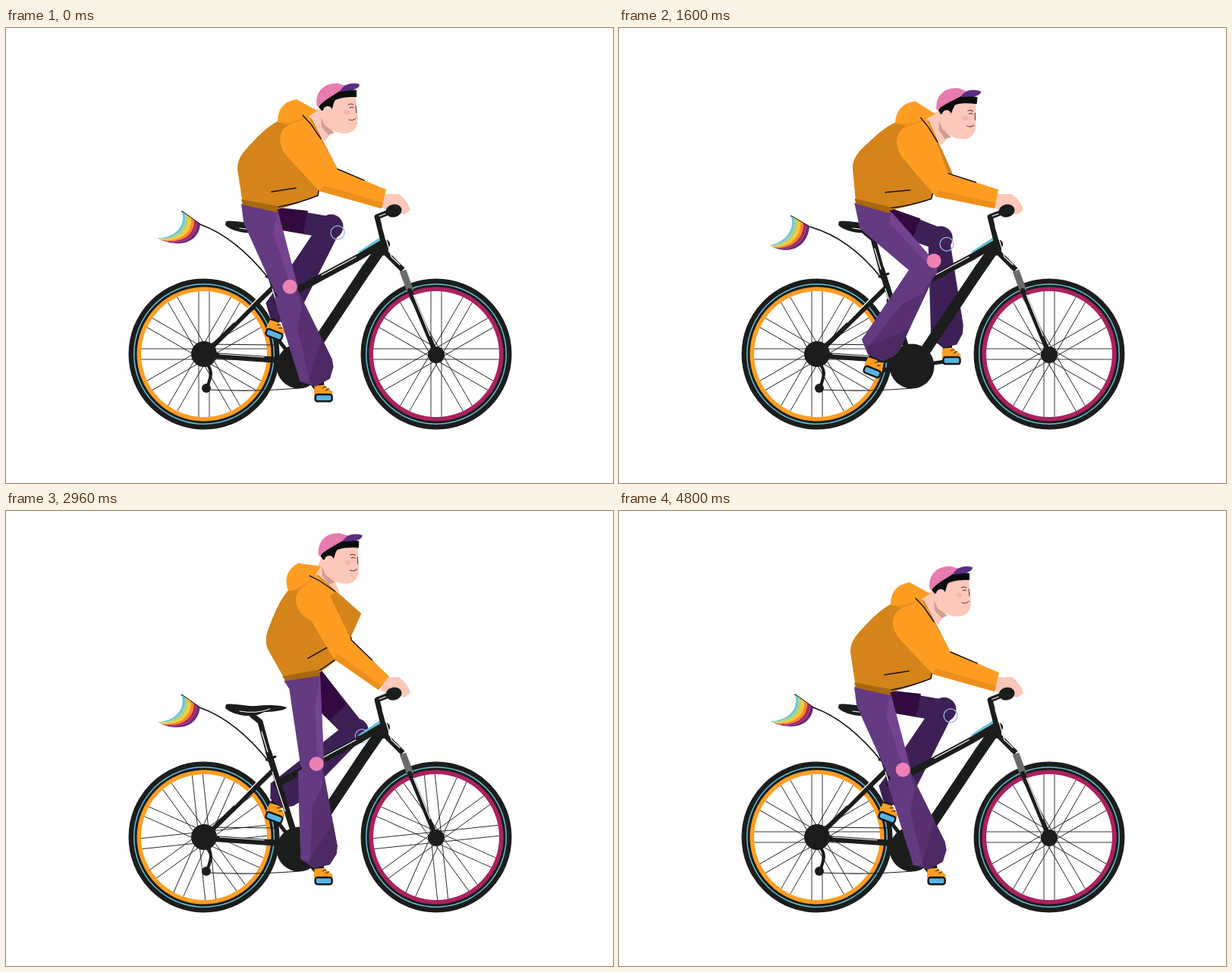
An HTML page that plays this animation: 800 by 600 pixels, repeating every 4880 ms.

```html
<!DOCTYPE html>
<html lang="en">
<head>
<meta charset="utf-8">
<title>Cyclist</title>
<style>
html, body { margin: 0; width: 100%; height: 100%; overflow: hidden; background: #fff; }
svg { display: block; width: 100vw; height: 100vh; }
</style>
</head>
<body>
<svg viewBox="0 0 800 600" stroke-linejoin="round" stroke-linecap="round">
  <g id="wheels"></g>

  <!-- far leg -->
  <g fill="none" stroke="#1b1d1c">
    <path id="farCrank" stroke-width="5"/>
  </g>
  <g id="farFoot"></g>
  <path id="farCalf" fill="#3d2055"/>
  <path id="farThigh" fill="#3d2055"/>
  <path id="farShade" fill="#320a40"/>
  <circle id="farKnee" r="16" fill="#3d2055"/>
  <circle id="farDot" r="9" fill="none" stroke="#9fb4e6" stroke-width="1.3"/>

  <!-- flag -->
  <path id="pole" fill="none" stroke="#151716" stroke-width="1.7"/>
  <g id="flag"></g>

  <!-- bike -->
  <g fill="none" stroke="#1b1d1c">
    <path d="M262 417L356 418M265 477Q330 480 386 475" stroke-width="1.2"/>
    <path d="M264 442C275 455 268 462 265 475" stroke-width="4"/>
    <path d="M493 276L463 296L474 297L498 284Z" fill="#62bfd6" stroke="none"/>
    <path d="M499 293L488 312L440 380L437 386L437 373L470 312Z" fill="#62bfd6" stroke="none"/>
    <path d="M274 432L375 439" stroke-width="8"/>
    <path d="M352 342L268 424" stroke-width="6"/>
    <path d="M324 269L335 278L348 326" stroke-width="7"/>
    <path d="M346 318L380 426" stroke-width="8"/>
    <path d="M343 328L355 324" stroke-width="3"/>
    <path d="M494 285L467 301L357 360" stroke-width="9"/>
    <path d="M497 287L470 326L396 437" stroke-width="14"/>
    <path d="M512 240L489 249L501 297L512 308L523 319" stroke-width="7" stroke-linecap="butt"/>
    <path d="M500 285L497 294" stroke-width="12"/>
    <path d="M523 320L533 347" stroke="#6a6c6c" stroke-width="9" stroke-linecap="butt"/>
    <path d="M532 346L567 430" stroke-width="6"/>
    <path d="M416 326L461 302M301 388L340 348M351 344L368 396M496 262L508 302L519 312M537 352L559 406M492 248L500 245M337 291L345 318M282 430L340 434" stroke="#fff" stroke-width="1.2"/>
  </g>
  <path d="M290 255C302 253 315 258 330 257C345 255 362 256 370 259C369 263 350 265 341 265C335 267 331 271 318 270C308 270 290 264 289 259Z" fill="#1b1d1c"/>
  <path d="M308 264Q330 268 348 261" fill="none" stroke="#fff"/>
  <g fill="#1b1d1c">
    <circle cx="261" cy="430" r="17"/>
    <circle cx="264" cy="475" r="6"/>
    <circle cx="567" cy="431" r="11"/>
    <circle cx="386" cy="446" r="29.5"/>
  </g>

  <!-- near leg -->
  <path id="nearCrank" fill="none" stroke="#1b1d1c" stroke-width="6"/>
  <g id="nearFoot"></g>
  <path id="nearThigh" fill="#643a80"/>
  <path id="nearCalf" fill="#58306f"/>
  <path id="nearShade" fill="#643a80"/>
  <path id="nearHem" fill="#4d2964"/>
  <circle id="nearKnee" r="15" fill="#643a80"/>
  <path id="nearLight" fill="#74438f"/>
  <circle id="nearDot" r="9.5" fill="#ec82b3"/>

  <!-- rider -->
  <path id="neck" fill="#fcc8ba"/>
  <path id="neckShade" fill="#cf9f92"/>
  <g id="torso">
    <path d="M305 186C305 174 310 167 317 159C331 144 344 130 358 123L402 118L437 186L413 210L411 221Q386 232 358 239L312 232Z" fill="#d4841a"/>
    <path d="M310 226L358 235L357 243L312 233Z" fill="#a8680f"/>
    <path d="M413 210L411 221Q386 231 359 236M350 216L382 211" fill="none" stroke="#111" stroke-width="1.5"/>
    <path d="M358 124C358 107 366 97 383 94L410 109L399 116L416 147L404 150L372 126Z" fill="#ff9d23"/>
    <path d="M358 124Q378 127 398 115L391 121L372 128Z" fill="#ec8f1c"/>
  </g>
  <g id="head">
    <path d="M424 90L460 88C463 98 461 105 463 112C466 126 462 139 446 139C431 139 420 130 418 108Z" fill="#fcc8ba"/>
    <path d="M412 104C418 94 432 84 446 80L462 82L462 91C452 91 443 91 434 95C431 99 431 106 429 108L416 109Z" fill="#0b0b0b"/>
    <circle cx="424" cy="109" r="6" fill="#fcc8ba"/>
    <path d="M410 104C406 85 419 72 437 73L448 76C442 84 424 91 411 104Z" fill="#e87bb0"/>
    <path d="M440 84C444 75 453 71 466 74Q466 80 455 82Z" fill="#5b2e82"/>
    <ellipse cx="449" cy="111" rx="4" ry="3" fill="#f8b3a8"/>
    <path d="M451 101Q455 99 458 101M453 105Q456 103 458 105M452 121Q457 123 461 119M461 103L462 112" fill="none" stroke="#5a2b2b" stroke-width="1"/>
  </g>
  <path d="M497 219L518 219Q530 228 533 240L525 246L511 241L494 237Z" fill="#fcc8ba"/>
  <ellipse cx="511" cy="241" rx="10.5" ry="8.5" transform="rotate(-12 511 241)" fill="#1b1d1c"/>
  <path id="arm" fill="#ff9d23"/>
  <path id="armShade" fill="#ec8f1c"/>
  <path id="armLine" fill="none" stroke="#111" stroke-width="1.4"/>
</svg>
<script>
const $ = id => document.getElementById(id);
const TAU = Math.PI * 2, RAD = Math.PI / 180;
const LOOP = 4880, STEP = 80, SPAN = 4800;
const CRANK = [386, 446], CRANK_R = 53;

const clamp = v => Math.min(1, Math.max(0, v));
const ease = v => { v = clamp(v); return v * v * (3 - 2 * v); };
const mix = (a, b, u) => a.map((v, i) => v + (b[i] - v) * u);
const add = (a, b) => [a[0] + b[0], a[1] + b[1]];
const mul = (a, s) => [a[0] * s, a[1] * s];
const turn = ([x, y], deg) => {
  const c = Math.cos(deg * RAD), s = Math.sin(deg * RAD);
  return [x * c - y * s, x * s + y * c];
};
const pt = p => p[0].toFixed(2) + ' ' + p[1].toFixed(2);
const poly = pts => 'M' + pts.map(pt).join('L') + 'Z';
const shape = (id, d) => $(id).setAttribute('d', d);
const place = (id, p) => { $(id).setAttribute('cx', p[0]); $(id).setAttribute('cy', p[1]); };

// hip x y, lean, head x y, tilt, elbow top, elbow bottom, cuff top, cuff bottom
const SIT = [335, 236, 0, 440, 108, 0, 437, 186, 413, 215, 501, 213, 495, 238];
const DIP = [335, 236, 3.2, 448, 115, 6, 434, 192, 417, 222, 500, 213, 495, 238];
const RISE = [352, 225, -7.5, 439, 83, -7, 453, 167, 425, 188, 505, 215, 490, 236];
const STAND = [391, 220, -21, 442, 66, 3, 455, 170, 432, 195, 505, 218, 491, 236];

const FLAG = ['#6ec6d9', '#b5cf72', '#f9c82e', '#f28c28', '#b3265e', '#672a7c'];
const FOOT = `
  <path d="M-11 -25H0L1 -13H-12Z" fill="#151716"/>
  <path d="M-12 -16L0 -17L11 -9Q13 -6 11 -4H-13Z" fill="#ff9d23"/>
  <path d="M-1 -13L3 -15M3 -10L7 -12" stroke="#151716"/>
  <rect x="-11" y="-4.5" width="22" height="9" rx="3" fill="#58b4e4" stroke="#151716" stroke-width="2.5"/>`;

function buildWheel(id, x, rim) {
  let spokes = '';
  for (let i = 0; i < 12; i++) {
    spokes += `<path d="M-7 0V-83M7 0V-83" transform="rotate(${i * 30})"/>`;
  }
  return `<g transform="translate(${x} 430)" fill="none">
    <g id="${id}" stroke="#222" stroke-width=".9">${spokes}</g>
    <circle r="86" stroke="${rim}" stroke-width="6"/>
    <circle r="94" stroke="#1b1d1c" stroke-width="11"/>
    <circle r="92.3" stroke="#62bfd6" stroke-width="1.5"/></g>`;
}

$('wheels').innerHTML = buildWheel('rear', 261, '#ff9d23') + buildWheel('front', 567, '#ad2160');
$('nearFoot').innerHTML = $('farFoot').innerHTML = FOOT;
$('flag').innerHTML = FLAG.map((c, i) => `<path id="stripe${i}" fill="${c}"/>`).join('');

// two full turns, a coast while standing, then one more turn
function pedalAngle(t) {
  const last = clamp((t - 3600) / 1200);
  return 52 + Math.min(t, 2400) * .3 + 360 * Math.pow(last, 1.5);
}

function pose(t, angle) {
  const k = ease((t - 2280) / 560) * (1 - ease((t - 3440) / 480));
  const dip = clamp((.74 - Math.cos((angle - 10) * RAD)) / 1.71);
  const base = mix(SIT, DIP, dip);
  const p = base.map((v, i) =>
    v * (1 - k) * (1 - 2 * k) + RISE[i] * 4 * k * (1 - k) + STAND[i] * k * (2 * k - 1));
  const lift = 2 * k * clamp((3440 - t) / 640) * clamp((t - 2600) / 200);
  p[1] -= lift;
  p[4] -= lift;
  return p;
}

function joint(hip, foot, l1, l2) {
  const dx = foot[0] - hip[0], dy = foot[1] - hip[1], d = Math.hypot(dx, dy);
  const s = Math.max(1, d / (l1 + l2));
  l1 *= s; l2 *= s;
  const a = (l1 * l1 - l2 * l2 + d * d) / (2 * d);
  const h = Math.sqrt(Math.max(0, l1 * l1 - a * a));
  return { p: [hip[0] + (dx * a + dy * h) / d, hip[1] + (dy * a - dx * h) / d], h };
}

function drawLeg(side, angle, hip, l1, l2, waist) {
  const pedal = add(CRANK, mul([Math.cos(angle * RAD), Math.sin(angle * RAD)], CRANK_R));
  const tilt = 25 * Math.max(0, -Math.cos((angle - 20) * RAD));
  const ankle = add(pedal, turn([-5, -23], tilt));
  const { p: knee, h } = joint(hip, ankle, l1, l2);
  shape(side + 'Crank', 'M' + pt(CRANK) + 'L' + pt(pedal));
  $(side + 'Foot').setAttribute('transform', `translate(${pt(pedal)}) rotate(${tilt})`);

  const thigh = Math.atan2(knee[1] - hip[1], knee[0] - hip[0]) / RAD;
  const up = turn([0, -1], thigh);
  const shin = [ankle[0] - knee[0], ankle[1] - knee[1]];
  const len = Math.hypot(...shin), ux = shin[0] / len, uy = shin[1] / len;
  // x runs forward, y runs along the shin from 0 to 1
  const at = (x, y) => [knee[0] + uy * x + ux * y * len, knee[1] - ux * x + uy * y * len];
  const w = side === 'near' ? 1 : .88;

  shape(side + 'Thigh', poly([...waist, add(knee, mul(up, 17 * w)), add(knee, mul(up, -14)), add(hip, mul(up, -20 * w))]));
  shape(side + 'Calf', poly([at(14 * w, -.05), at(25 * w, .84), at(23 * w, .92), at(13 * w, 1.02),
    at(-8 * w, 1.04), at(-25 * w, .94), at(-24 * w, .85), at(-18 * w, .06)]));
  place(side + 'Knee', add(knee, mul(up, 2)));

  if (side === 'far') {
    const mid = mix(hip, knee, .62);
    shape('farShade', poly([...waist, add(mid, mul(up, 16)), add(mid, mul(up, -15)), add(hip, mul(up, -17))]));
    place('farDot', add(knee, [9, 6]));
    return;
  }
  shape('nearShade', poly([at(14, -.05), at(13, .22), at(-3, .42), at(-13, .98), at(-25, .94), at(-24, .85), at(-18, .06)]));
  shape('nearHem', poly([at(22, .6), at(25, .84), at(23, .92), at(13, 1.02), at(-8, 1.04), at(-14, .97)]));
  const high = mix(hip, knee, .25);
  shape('nearLight', poly([waist[1], add(knee, mul(up, 17)), add(knee, mul(up, 8)), add(high, mul(up, 12))]));
  place('nearDot', add(knee, mul(up, 7 + 10 * clamp((h - 12) / 30))));
}

function drawFlag(t) {
  const ph = t / 960 * TAU;
  const drop = 4 * (1 - Math.cos(ph)), w = Math.cos(ph + .26);
  const top = [232 - drop * .85, 242 + drop], low = add(top, [24, 17 - drop * .5]);
  const tip = add(top, [-29 - 3.5 * w, 38 - 3 * w]);
  const edge = u => [
    mix(top, low, u),
    add(top, mix([5, 18], [22, 38], u)),
    add(top, mix([-7, 34], [2, 50 - 2 * w], u)),
    add(tip, [7 * u, 3.5 * u])
  ];
  FLAG.forEach((c, i) => {
    const a = edge(i / 6), b = edge((i + 1) / 6);
    shape('stripe' + i, `M${pt(a[0])}C${a.slice(1).map(pt).join(' ')}L${pt(b[3])}C${pt(b[2])} ${pt(b[1])} ${pt(b[0])}Z`);
  });
  shape('pole', `M346 330Q303 276 ${pt(low)}L${pt(top)}`);
}

function draw(ms) {
  const t = Math.floor((ms % LOOP) / STEP) * STEP % SPAN;
  const spin = `rotate(${t * .15})`;
  $('rear').setAttribute('transform', spin);
  $('front').setAttribute('transform', spin);
  drawFlag(t);

  const angle = pedalAngle(t), p = pose(t, angle);
  const hip = [p[0], p[1]], face = [p[3], p[4]];
  const body = (x, y) => add(hip, turn([x - 335, y - 236], p[2]));
  const skull = (x, y) => add(face, turn([x - 440, y - 108], p[5]));

  drawLeg('far', angle + 180, body(340, 245), 90, 137, [body(335, 234), body(361, 237)]);
  drawLeg('near', angle, body(332, 250), 100, 129, [body(310, 232), body(358, 240)]);

  $('torso').setAttribute('transform', `translate(${pt(hip)}) rotate(${p[2]}) translate(-335 -236)`);
  $('head').setAttribute('transform', `translate(${pt(face)}) rotate(${p[5]}) translate(-440 -108)`);
  shape('neck', poly([body(397, 116), skull(414, 104), skull(432, 134), body(420, 150)]));
  shape('neckShade', poly([skull(415, 118), skull(420, 128), skull(433, 138), skull(425, 141), skull(416, 131)]));

  const top = [p[6], p[7]], low = [p[8], p[9]], cuffT = [p[10], p[11]], cuffB = [p[12], p[13]];
  shape('arm', `M${pt(body(376, 127))}C${pt(body(357, 132))} ${pt(body(357, 156))} ${pt(body(372, 171))}` +
    `L${pt(low)}L${pt(cuffB)}L${pt(cuffT)}L${pt(top)}L${pt(body(405, 128))}Z`);
  shape('armShade', poly([low, mix(low, top, .25), mix(cuffB, cuffT, .3), cuffB]));
  shape('armLine', `M${pt(top)}L${pt(mix(top, cuffT, .55))}M${pt(body(391, 115))}L${pt(body(402, 127))}L${pt(body(415, 146))}`);
}

const start = performance.now();
function tick() {
  draw(performance.now() - start);
  requestAnimationFrame(tick);
}
tick();
</script>
</body>
</html>
```
